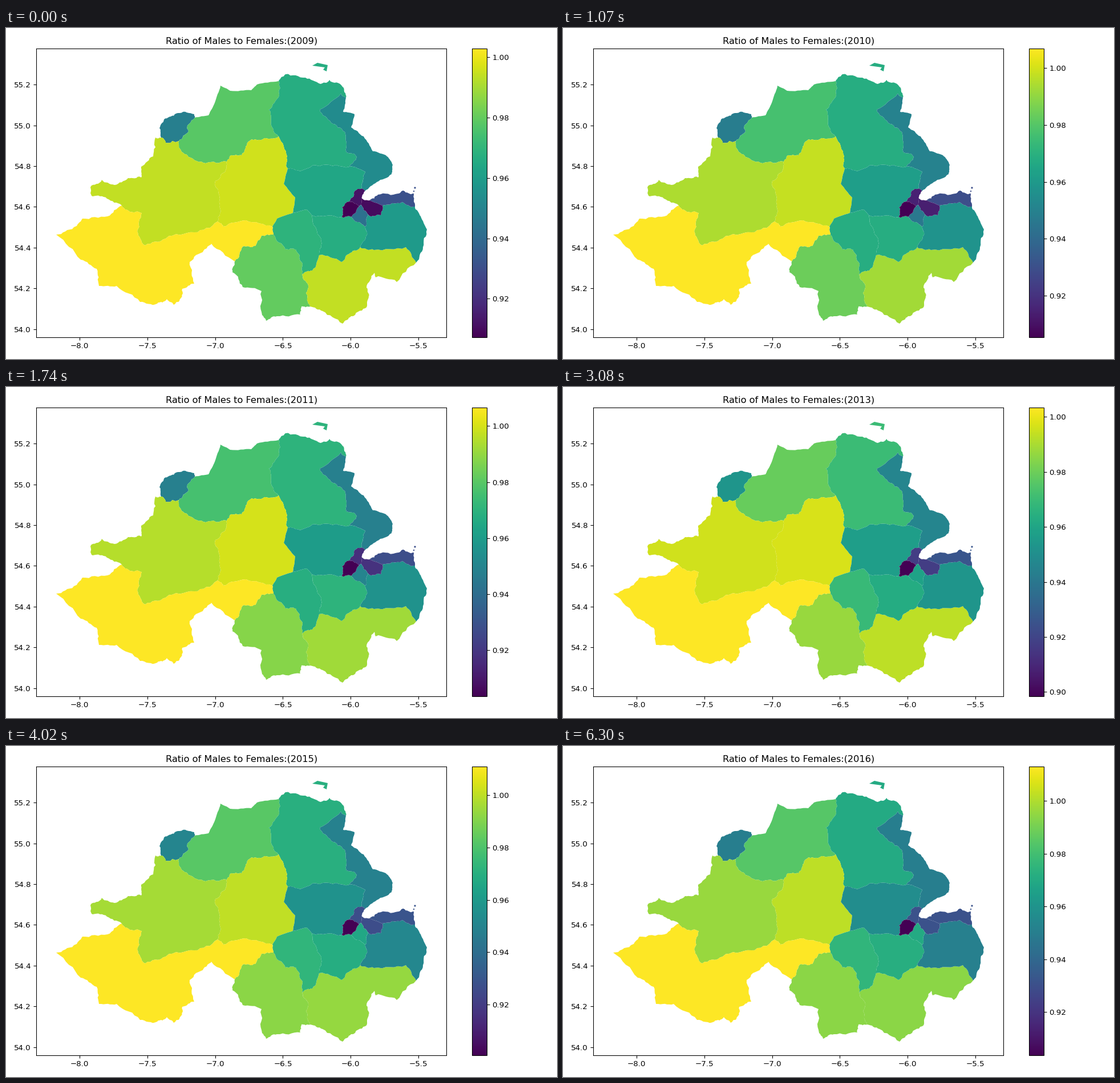
Write a matplotlib script that moves like this. It is 966 px wide and 580 px high and loops after 7.37 s.

```python
import math
import random

import matplotlib.pyplot as plt
import numpy as np
from matplotlib.animation import FuncAnimation
from matplotlib.collections import PolyCollection
from matplotlib.ticker import FormatStrFormatter, MultipleLocator

W, H, DPI = 966, 580, 100
LEFT, RIGHT, TOP, BOTTOM = 53.4, 772, 36, 542
STEP = 670

# Everything is set at 96.6 % of the default sizes
scaled = ["axes.linewidth", "axes.titlepad"]
scaled += [f"{a}tick.major.{k}" for a in "xy" for k in ("size", "width", "pad")]
plt.rcParams.update({key: plt.rcParams[key] * 0.966 for key in scaled})
plt.rcParams.update({"font.family": "DejaVu Sans", "font.size": 9.66})

rng = random.Random(7)
arcs = []


def roughen(pts, rough):
    """Split every segment and push its middle sideways by a few pixels."""
    out = pts[:1]
    for (x0, y0), (x1, y1) in zip(pts, pts[1:]):
        size = math.dist((x0, y0), (x1, y1))
        k = rng.uniform(-rough, rough) * min(1, 12 / size)
        out += [((x0 + x1) / 2 - k * (y1 - y0), (y0 + y1) / 2 + k * (x1 - x0)),
                (x1, y1)]
    return out


def arc(pair, *pts, rough=0.18):
    """Border shared by two regions ('~' is the sea), in stage pixels."""
    pts = list(pts)
    for _ in range(3):
        pts = roughen(pts, rough)
    arcs.append((pair, pts))


def outline(code):
    """Chain all borders of a region into one closed ring."""
    parts = [pts for pair, pts in arcs if code in pair]
    ring = list(parts.pop(0))
    while parts:
        nxt = next(p for p in parts if ring[-1] in (p[0], p[-1]))
        parts.remove(nxt)
        ring += nxt[1:] if nxt[0] == ring[-1] else nxt[-2::-1]
    return ring


def speck(x, y, r):
    return [(x - r, y), (x, y - r), (x + r, y), (x, y + r)]


def degrees(pts):
    return [(-8 + (x - 128.7) / 237.8, 54 + (527.7 - y) / 357.1) for x, y in pts]


# Coast
arc("D~", (272, 192), (271, 170), (284, 157), (304, 149), (330, 151), (331, 157))
arc("C~", (331, 157), (355, 153), (366, 131), (376, 101), (393, 110), (430, 109),
    (440, 99), (478, 93), rough=0.06)
arc("N~", (478, 93), (490, 81), (525, 87), (551, 98), (567, 91), (590, 103),
    (596, 122))
arc("E~", (596, 122), (591, 147), (611, 151), (605, 174), (627, 190), (643, 216),
    (668, 225), (678, 240), (676, 256), (650, 270), (629, 286), rough=0.1)
arc("B~", (629, 286), (624, 299))
arc("J~", (624, 299), (637, 302))
arc("H~", (637, 302), (652, 292), (688, 290), (697, 285), (715, 290), (717, 313))
arc("G~", (717, 313), (727, 330), (738, 353), (731, 384), (719, 411))
arc("S~", (719, 411), (685, 445), (648, 437), (646, 429), (632, 455), (636, 470),
    (630, 491), (605, 505), (590, 518), (555, 496), (533, 488))
arc("A~", (401, 409), (397, 428), (415, 454), (448, 461), (449, 503), (456, 513),
    (475, 505), (516, 502), (518, 488), (533, 488))
arc("F~", (203, 311), (178, 330), (134, 334), (119, 349), (88, 362), (131, 406),
    (159, 422), (163, 452), (194, 452), (235, 480), (265, 483), (282, 475),
    (294, 485), (304, 478), (309, 457), (330, 448), (322, 410), (347, 389),
    (360, 378), (401, 409))
arc("T~", (272, 192), (262, 192), (258, 225), (237, 243), (237, 262), (214, 263),
    (190, 275), (168, 266), (148, 279), (152, 295), (177, 299), (203, 311))

# Inland borders
arc("DC", (331, 157), (318, 171), (320, 181), (303, 198))
arc("DT", (303, 198), (280, 201), (272, 192))
arc("CT", (387, 234), (350, 237), (320, 226), (303, 209), (303, 198))
arc("CN", (478, 93), (479, 118), (461, 143), (468, 176), (478, 190))
arc("CM", (478, 190), (450, 195), (425, 199), (413, 223), (393, 224), (387, 234))
arc("TM", (387, 234), (384, 252), (367, 268), (375, 310), (371, 339))
arc("TF", (203, 311), (217, 322), (238, 324), (230, 356), (244, 381), (280, 369),
    (330, 358), (371, 339))
arc("MF", (371, 339), (381, 348), (421, 337), (467, 348))
arc("NM", (478, 190), (493, 225), (494, 246))
arc("MP", (494, 246), (487, 273), (507, 297), (503, 324), rough=0.04)
arc("NE", (596, 122), (587, 115), (550, 143), (570, 166), (594, 182), (597, 218),
    (615, 226), (602, 243))
arc("NP", (494, 246), (510, 249), (555, 240), (602, 243))
arc("EP", (602, 243), (630, 252), (624, 281))
arc("MU", (503, 324), (475, 334), (467, 348), rough=0.04)
arc("FU", (467, 348), (469, 362))
arc("FA", (469, 362), (448, 364), (437, 382), (415, 383), (401, 409))
arc("AU", (519, 432), (518, 410), (508, 388), (490, 388), (469, 362))
arc("AS", (533, 488), (526, 465), (530, 455), (519, 432))
arc("US", (519, 432), (537, 425), (549, 398))
arc("UL", (549, 398), (553, 370), (536, 328))
arc("UP", (503, 324), (527, 318), (536, 328), rough=0.04)
arc("LP", (536, 328), (589, 331))
arc("LS", (549, 398), (588, 410), (601, 396), (621, 384))
arc("LG", (630, 348), (633, 358), (621, 384))
arc("GS", (621, 384), (645, 389), (701, 384), (719, 411))
arc("HG", (660, 311), (695, 305), (717, 313))

# City borders
arc("EB", (624, 281), (629, 286))
arc("PB", (602, 304), (614, 284), (624, 281))
arc("PW", (589, 331), (589, 314), (602, 304))
arc("BW", (602, 304), (619, 313))
arc("BO", (619, 313), (623, 310))
arc("BJ", (624, 299), (623, 310))
arc("JH", (637, 302), (660, 311), rough=0.04)
arc("JG", (660, 311), (657, 328), (635, 327))
arc("JO", (623, 310), (635, 327))
arc("WO", (619, 313), (605, 331))
arc("WL", (589, 331), (605, 331))
arc("OL", (605, 331), (618, 340), (630, 348))
arc("OG", (635, 327), (630, 348))

islands = [
    ("N", [(537, 66), (546, 61), (564, 65), (562, 76), (556, 73), (559, 69)]),
    ("H", speck(717, 280, 2)),
    ("H", speck(715, 286, 1.5)),
    ("C", speck(454, 97, 1.2)),
]

years = np.arange(2009, 2017)
lows = [.9072, .9053, .9035, .9030, .8984, .8987, .9005, .9036]
highs = [1.0029, 1.0069, 1.0066, 1.0054, 1.0034, 1.0090, 1.0110, 1.0130]

# Males per 1000 females in the key years, linear in between
key_years = [2009, 2011, 2013, 2016]
trends = {
    "D": (948, 948, 953, 950), "C": (978, 976, 979, 984),
    "N": (967, 970, 970, 970), "E": (953, 948, 946, 950),
    "T": (994, 995, 996, 996), "M": (996, 1000, 997, 1002),
    "A": (980, 988, 987, 994), "S": (994, 992, 993, 994),
    "U": (969, 968, 969, 975), "L": (967, 970, 963, 972),
    "P": (964, 960, 957, 957), "G": (959, 956, 953, 951),
    "H": (931, 928, 926, 931), "B": (912, 917, 917, 931),
    "J": (910, 918, 917, 931), "O": (942, 950, 959, 970),
}
ratios = {c: np.interp(years, key_years, v) / 1000 for c, v in trends.items()}
ratios.update(F=highs, W=lows)

codes = list(ratios) + [code for code, _ in islands]
shapes = [outline(c) for c in ratios] + [pts for _, pts in islands]


def panel(fig, left, right):
    return fig.add_axes([left / W, 1 - BOTTOM / H, (right - left) / W,
                         (BOTTOM - TOP) / H])


fig = plt.figure(figsize=(W / DPI, H / DPI), dpi=DPI, facecolor="white")
ax = panel(fig, LEFT, RIGHT)
(x0, y1), (x1, y0) = degrees([(LEFT, TOP), (RIGHT, BOTTOM)])
ax.set(xlim=(x0, x1), ylim=(y0, y1))
ax.xaxis.set_major_locator(MultipleLocator(0.5))
ax.yaxis.set_major_locator(MultipleLocator(0.2))
ax.yaxis.set_major_formatter(FormatStrFormatter("%.1f"))
title = ax.set_title("")
land = PolyCollection([degrees(s) for s in shapes], linewidths=0, cmap="viridis")
ax.add_collection(land, autolim=False)
land.set_clim(lows[0], highs[0])
fig.colorbar(land, cax=panel(fig, 817.4, 842.7), ticks=MultipleLocator(0.02),
             format="%.2f")


def update(i):
    k = min(i, len(years) - 1)
    title.set_text(f"Ratio of Males to Females:({years[k]})")
    land.set_array(np.array([ratios[c][k] for c in codes]))
    land.set_clim(lows[k], highs[k])
    return land, title


# Eight years, the last one held for four steps
anim = FuncAnimation(fig, update, frames=11, interval=STEP, repeat=True, blit=False)
plt.show()
```
